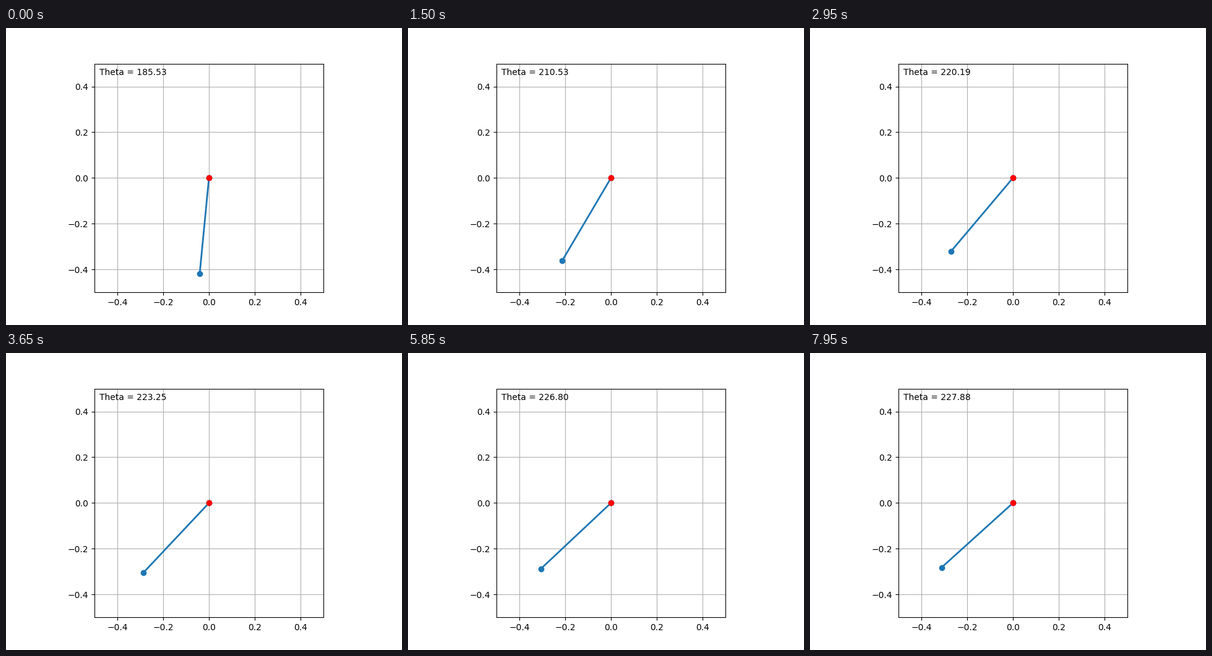
A matplotlib script for the animation above (8 s loop, 640x480 px).

```python
import numpy as np
import matplotlib.pyplot as plt
from matplotlib.animation import FuncAnimation

STEP = 50          # ms per frame
FRAMES = 160
LENGTH = 0.42      # rod length
REST = 228.25      # settling angle, degrees
PERIOD = 0.7155    # seconds per swing once the motion is small


def angle(t):
    """Damped swing: the first, wide swings are slower and lean upwards."""
    amp = 54.9 * np.exp(-0.62 * t)
    lean = 0.004 * amp**2 / (1 + 0.0002 * amp**2)
    swings = t / PERIOD - 0.174 + 0.24 * np.exp(-2.6 * t)
    return REST + lean - amp * np.cos(2 * np.pi * swings)


fig = plt.figure(figsize=(6.4, 4.8), dpi=100)
ax = fig.add_subplot(111, aspect="equal", xlim=(-0.5, 0.5), ylim=(-0.5, 0.5))
ax.grid()

rod, = ax.plot([], [], "o-", lw=2)
ax.plot([0], [0], "ro")
label = ax.text(0.02, 0.95, "", transform=ax.transAxes)


def draw(i):
    theta = angle(i * STEP / 1000)
    rad = np.radians(theta)
    rod.set_data([0, LENGTH * np.sin(rad)], [0, LENGTH * np.cos(rad)])
    label.set_text(f"Theta = {theta:.2f}")
    return rod, label


anim = FuncAnimation(fig, draw, frames=FRAMES, interval=STEP, repeat=True)
plt.show()
```
